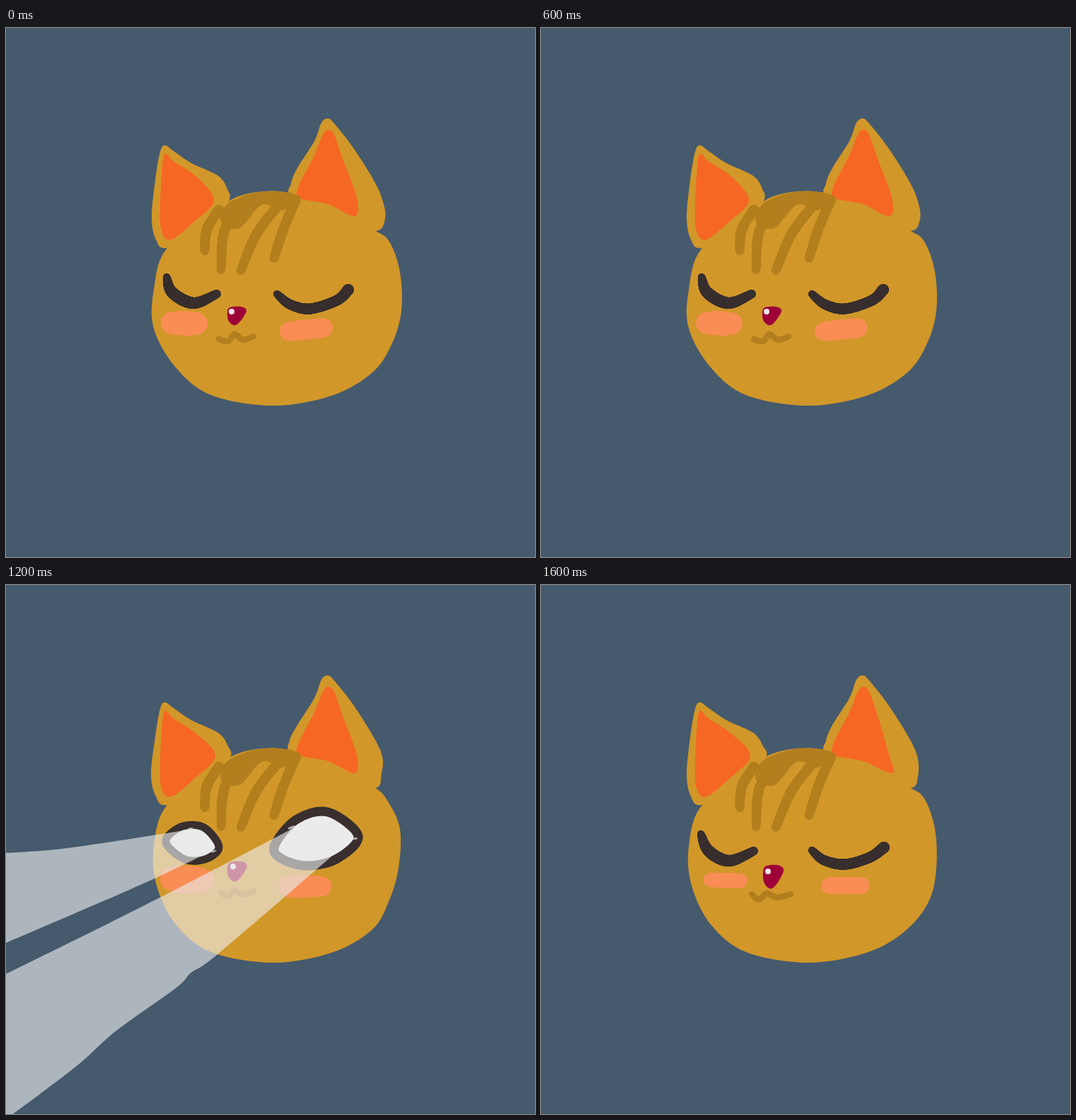
Animation of 748x748 px, one loop 1700 ms. Source, as an HTML page with a canvas:

```html
<!DOCTYPE html>
<html lang="en">
<head>
<meta charset="utf-8">
<title>Cat with beaming eyes</title>
<style>
html, body { margin: 0; width: 100%; height: 100%; overflow: hidden; background: #465a6e; }
canvas { display: block; width: 748px; height: 748px; }
</style>
</head>
<body>
<canvas id="stage" width="748" height="748"></canvas>
<script>
const ctx = document.getElementById('stage').getContext('2d');
const ink = '#382f2e', stripe = '#b37f1e', pale = '#ebebeb';

// Head and ears, as flat x, y runs
const head = [300, 262, 318, 243, 348, 233, 385, 231, 420, 240, 470, 258, 521, 286, 542, 302, 557, 345, 559, 400,
  545, 448, 517, 488, 460, 520, 377, 534, 290, 519, 240, 480, 213, 425, 209, 370, 228, 311];
const earL = [228, 311, 212, 299, 206, 268, 211, 215, 218, 175, 225, 166, 237, 174, 262, 191, 300, 209, 314, 228, 317, 245, 290, 290];
const earR = [404, 238, 403, 220, 412, 198, 436, 160, 446, 134, 455, 128, 464, 135, 490, 168, 518, 212, 532, 242, 533, 270, 521, 287, 460, 270];
const innerL = [228, 179, 236, 188, 270, 211, 296, 242, 266, 274, 234, 299, 220, 288, 218, 250, 222, 186];
const innerR = [456, 144, 464, 151, 476, 185, 496, 240, 493, 266, 455, 249, 416, 241, 413, 226, 436, 180, 448, 151];
const fringe = [304, 275, 312, 250, 348, 234, 385, 231, 412, 238, 392, 258, 362, 250, 330, 283];
const stripes = [[301, 257, 284, 285, 281, 315], [328, 252, 308, 290, 304, 342],
  [390, 245, 355, 290, 332, 343], [410, 243, 392, 285, 379, 326]];

// Redrawn outlines: point index, dx, dy
const wobble = {
  A: { head: [[16, -4, 0]], earR: [[10, 3, 0]], earL: [[9, -1, 0], [10, -2, 0]], innerL: [[3, -2, 2]] },
  B: { head: [[7, -2, 4], [9, -4, 0], [10, -4, 0]], earL: [[2, -1, 0]], earR: [[1, -2, 0], [10, -2, -4]] },
  C: { head: [[10, 4, 5], [16, 2, 0], [17, 4, 0]], earL: [[1, -2, 0], [2, -4, 0], [3, -6, 0]], innerR: [[4, 5, 2]] },
  D: {
    head: [[8, 8, 0], [9, 10, 0], [10, 3, 0], [16, -3, 0]], earL: [[9, 8, 0], [10, 10, 0]],
    earR: [[8, -3, 0], [9, -8, 0], [10, -7, 0]], innerR: [[3, -9, 0], [4, -5, -6]]
  },
  E: { head: [[10, 3, 0], [11, -3, 2]], earL: [[10, 1, 0]], innerR: [[3, -4, 0], [4, 4, 0]] }
};

const closedEyes = {
  sleep: [[227, 352, 235, 374, 265, 389, 298, 376], [383, 376, 402, 391, 430, 397, 468, 385, 484, 370]],
  calm: [[227, 352, 236, 373, 268, 388, 301, 371], [379, 372, 395, 388, 428, 396, 464, 386, 484, 370]],
  rest: [[226, 352, 237, 376, 266, 390, 301, 376], [383, 375, 400, 389, 430, 395, 465, 385, 485, 371]]
};
// Outline of the lids, along the middle of the line
const openEyes = {
  wide: [[225, 360, 236, 340, 266, 330, 296, 346, 308, 365, 290, 390, 260, 392, 234, 380],
    [380, 368, 396, 332, 430, 313, 478, 316, 496, 353, 466, 389, 424, 396, 390, 382]],
  stare: [[227, 358, 250, 341, 280, 343, 301, 370, 284, 387, 256, 389, 232, 373],
    [380, 368, 410, 332, 455, 321, 498, 355, 468, 387, 425, 397, 388, 386]],
  glare: [[229, 352, 265, 358, 305, 361, 297, 384, 265, 390, 236, 375],
    [385, 369, 430, 357, 487, 351, 476, 376, 430, 398, 396, 388]]
};
const slitEyes = [[225, 349, 262, 366, 305, 367, 305, 388, 265, 400, 228, 380],
  [386, 364, 430, 371, 488, 362, 485, 385, 435, 405, 385, 385]];
const slits = [[239, 368, 256, 378, 277, 380], [404, 385, 432, 388, 461, 385]];

// x0, y0, x1, y1, end radius, middle radius
const cheeks = {
  sleep: [[234, 417, 270, 418, 15, 17], [400, 429, 449, 424, 13, 14]],
  calm: [[234, 416, 278, 417, 16, 19], [399, 427, 446, 426, 14, 15]],
  rest: [[240, 417, 282, 418, 10, 10.5], [408, 425, 453, 425, 11.5, 12]],
  slit: [[242, 417, 283, 417, 9, 9], [406, 424, 453, 424, 9.5, 9.5]],
  wide: [[240, 419, 289, 416, 11, 12], [404, 425, 461, 422, 14, 15]],
  glare: [[238, 418, 278, 418, 8, 12], [403, 428, 451, 427, 9, 13]]
};
cheeks.stare = cheeks.calm;

const noseShape = [.12, .05, .7, 0, 1, .18, .85, .55, .55, .93, .3, 1, .05, .75, 0, .35];
// x, y, width, height, then the shine
const noses = {
  sleep: [313, 394, 27, 26, 319, 401],
  calm: [313, 391, 28, 28, 321, 398],
  rest: [314, 396, 29, 33, 321, 405],
  slit: [314, 397, 30, 33, 321, 404],
  wide: [314, 395, 27, 32, 323, 403],
  glare: [313, 396, 30, 32, 322, 404]
};
noses.stare = noses.calm;

const mouths = {
  sleep: [301, 440, 314, 443, 323, 433, 335, 441, 350, 436],
  calm: [308, 436, 316, 437, 323, 429, 334, 434, 352, 429],
  rest: [298, 437, 308, 445, 319, 436, 334, 442, 353, 437],
  slit: [298, 447, 307, 452, 318, 437, 330, 449, 347, 449],
  wide: [303, 443, 312, 449, 321, 438, 331, 449, 346, 446],
  stare: [304, 435, 314, 440, 323, 432, 333, 438, 350, 433],
  glare: [301, 444, 310, 450, 320, 439, 331, 449, 347, 448]
};

const beams = [
  [0, 379, 0, 379, 70, 374, 150, 363, 258, 346, 258, 346, 289, 377, 289, 377, 190, 424, 0, 506, 0, 506],
  [0, 550, 0, 550, 150, 476, 270, 415, 402, 346, 402, 346, 488, 360, 488, 360, 430, 410,
    297, 524, 262, 548, 240, 570, 155, 631, 100, 680, 10, 748, 10, 748, 0, 748, 0, 748]
];

// Smooth curve segments through the points; a doubled point makes a corner.
function segments(n, closed) {
  const len = n.length / 2, out = [];
  const at = i => {
    const k = closed ? (i + len) % len : Math.max(0, Math.min(len - 1, i));
    return [n[2 * k], n[2 * k + 1]];
  };
  for (let i = 0; i < (closed ? len : len - 1); i++) {
    const [a, b, c, d] = [at(i - 1), at(i), at(i + 1), at(i + 2)];
    out.push([b, b.map((v, k) => v + (c[k] - a[k]) / 6), c.map((v, k) => v - (d[k] - b[k]) / 6), c]);
  }
  return out;
}

function curve(n, closed = true) {
  const path = new Path2D();
  path.moveTo(n[0], n[1]);
  for (const [, p, q, end] of segments(n, closed)) path.bezierCurveTo(...p, ...q, ...end);
  if (closed) path.closePath();
  return path;
}

function fill(color, path) {
  ctx.fillStyle = color;
  ctx.fill(path);
}

function line(color, width, path) {
  ctx.strokeStyle = color;
  ctx.lineWidth = width;
  ctx.stroke(path);
}

function dot(x, y, r) {
  ctx.beginPath();
  ctx.arc(x, y, r, 0, Math.PI * 2);
  ctx.fill();
}

// Stroke whose radius swells from r0 through mid to r1
function brush(color, n, r0, mid, r1) {
  const segs = segments(n, false), fine = 50;
  ctx.fillStyle = color;
  segs.forEach(([a, p, q, b], s) => {
    for (let i = 0; i <= fine; i++) {
      const t = i / fine, u = 1 - t, all = (s + t) / segs.length;
      const [x, y] = a.map((v, k) => u * u * u * v + 3 * u * u * t * p[k] + 3 * u * t * t * q[k] + t * t * t * b[k]);
      const end = r0 + (r1 - r0) * all;
      dot(x, y, end + (mid - end) * Math.sin(Math.PI * all));
    }
  });
}

function nudge(n, moves = []) {
  const out = n.slice();
  for (const [i, dx, dy] of moves) {
    out[2 * i] += dx;
    out[2 * i + 1] += dy;
  }
  return curve(out);
}

function drawBody(w) {
  for (const [n, key] of [[head, 'head'], [earL, 'earL'], [earR, 'earR']]) fill('#d19729', nudge(n, w[key]));
  fill('#f66723', nudge(innerL, w.innerL));
  fill('#f66723', nudge(innerR, w.innerR));
  fill(stripe, curve(fringe));
  for (const s of stripes) brush(stripe, s, 7, 7, 6);
}

function drawEyes(name) {
  if (closedEyes[name]) {
    const [l, r] = closedEyes[name];
    brush(ink, l, 5, 8.5, name === 'calm' ? 7.5 : 6);
    brush(ink, r, 5, 7.5, 8);
  } else if (name === 'slit') {
    slitEyes.forEach(e => fill(ink, curve(e)));
    slits.forEach(s => brush('#f5f4f4', s, .5, 2.7, .5));
  } else {
    openEyes[name].forEach((e, i) => {
      const path = curve(e);
      fill(name === 'glare' ? '#fff' : pale, path);
      line(ink, name === 'glare' ? 14 : 11 + 2 * i, path);
    });
  }
}

function drawFace(name) {
  for (const [x0, y0, x1, y1, end, mid] of cheeks[name]) brush('#f98e55', [x0, y0, x1, y1], end, mid, end);
  drawEyes(name);
  const [x, y, w, h, sx, sy] = noses[name];
  fill('#9e0038', curve(noseShape.map((v, i) => i % 2 ? y + v * h : x + v * w)));
  ctx.fillStyle = '#f3e8ec';
  dot(sx, sy, 4);
  line(stripe, 8.5, curve(mouths[name], false));
}

const bodyOrder = [...'AEBABEAECEDDBEAEE'];
const faceOrder = ('sleep rest calm sleep calm rest sleep rest slit glare ' +
  'wide wide stare stare glare slit rest').split(' ');
const glow = { 10: .315, 11: .48, 12: .637, 13: .315 };
const STEP = 100;

function draw(i) {
  ctx.fillStyle = '#465a6e';
  ctx.fillRect(0, 0, 748, 748);
  ctx.lineCap = ctx.lineJoin = 'round';
  drawBody(wobble[bodyOrder[i]]);
  drawFace(faceOrder[i]);
  ctx.globalAlpha = glow[i] || 0;
  beams.forEach(b => fill(pale, curve(b)));
  ctx.globalAlpha = 1;
}

let start = null, shown = -1;
function tick(now) {
  if (start === null) start = now;
  const i = Math.floor((now - start) / STEP) % bodyOrder.length;
  if (i !== shown) draw(shown = i);
  requestAnimationFrame(tick);
}
draw(0);
requestAnimationFrame(tick);
</script>
</body>
</html>
```
